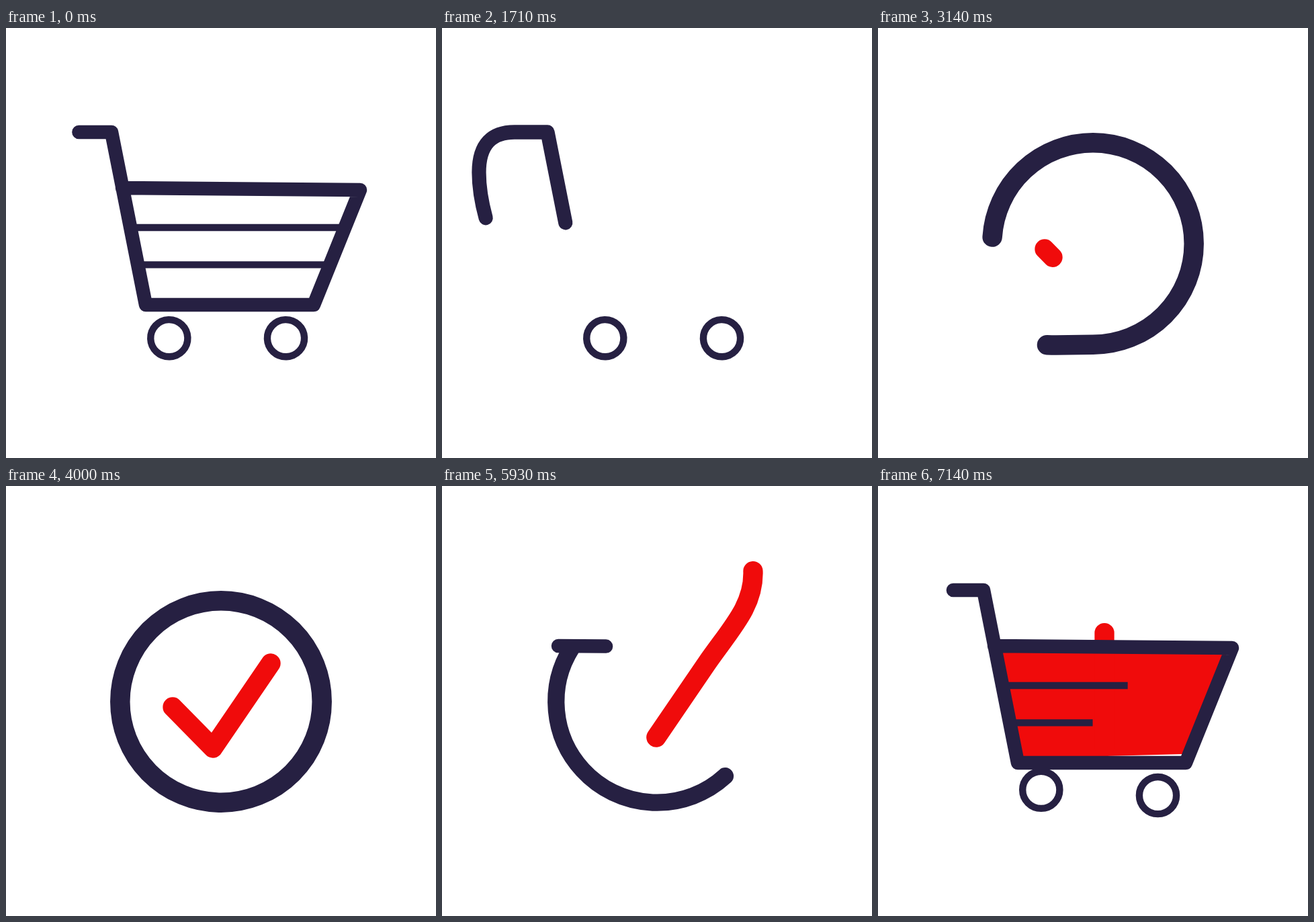
Write an HTML page with a canvas that moves like this. It is 640 px wide and 640 px high and loops after 7.21 s.

```html
<!DOCTYPE html>
<html lang="en">
<head>
<meta charset="utf-8">
<title>Cart checkout</title>
<style>
html, body { margin: 0; width: 100%; height: 100%; overflow: hidden; background: #fff; }
canvas { display: block; width: 100vw; height: 100vh; }
</style>
</head>
<body>
<canvas id="stage" width="640" height="640"></canvas>
<script>
const ctx = document.getElementById('stage').getContext('2d');
const LOOP = 7210, NAVY = '#262042', RED = '#f00b0b', RAD = Math.PI / 180;

const cart = 'M173 238L527 241 458 412 208 412 157 155 108 155';
const cartPath = new Path2D(cart);
const CART_LEN = 1099;
// The cart line runs on through a swoop into the circle.
const flowPath = new Path2D(cart +
  'C75 155 55 172 55 215C55 262 72 306 87 350C104 400 130 440 175 460' +
  'C205 471 250 472 265 472L320 471.2' +
  'A150.2 150.2 0 0 0 320 170.8A150.2 150.2 0 0 0 320 471.2');
// The tick runs on over a loop and down into the cart.
const tickPath = new Path2D('M248 329L308 390 394 264C430 212 463 180 463 130' +
  'C463 88 428 54 387 54C357 54 337 73 337 100V388');
const fillShape = new Path2D('M176 240L522 243 453.5 399 320 402.5 208 408Z');

const clamp = x => Math.min(1, Math.max(0, x));
function ease(t, start, end) {
  const x = clamp((t - start) / (end - start));
  return x * x * (3 - 2 * x);
}

// Smooth monotone curve through [time, value] keys.
function track(...keys) {
  const n = keys.length - 1;
  const slope = i => (keys[i + 1][1] - keys[i][1]) / (keys[i + 1][0] - keys[i][0]);
  const tan = keys.map((_, i) => {
    if (i === 0 || i === n) return 0;
    const a = slope(i - 1), b = slope(i);
    return a * b > 0 ? 2 * a * b / (a + b) : 0;
  });
  return t => {
    if (t <= keys[0][0]) return keys[0][1];
    if (t >= keys[n][0]) return keys[n][1];
    let i = 0;
    while (t > keys[i + 1][0]) i++;
    const [t0, v0] = keys[i], [t1, v1] = keys[i + 1];
    const h = t1 - t0, x = (t - t0) / h, y = 1 - x;
    return y * y * ((1 + 2 * x) * v0 + h * x * tan[i]) +
           x * x * ((1 + 2 * y) * v1 - h * y * tan[i + 1]);
  };
}

const flowTail = track([0, 0], [790, 330], [1140, 596], [1570, 850], [2360, 1167], [3140, 1553], [3930, 1618]);
const flowHead = track([1130, 1099], [1570, 1212], [2360, 1563], [3140, 2319], [3930, 2562]);
const flowWidth = track([1140, 20.5], [2360, 23.3], [3140, 29.5]);
const tickTail = track([5360, 0], [5430, 2.5], [6500, 322], [6930, 606], [7140, 705], [7350, 770]);
const tickHead = track([2990, 0], [3140, 17], [4000, 238.2], [5390, 238.2], [6140, 489], [6500, 702], [6720, 876]);
const level = track([6580, 408], [6930, 335], [7140, 238]);

function pen(color, width, cap) {
  ctx.strokeStyle = color;
  ctx.lineWidth = width;
  ctx.lineCap = cap || 'round';
  ctx.lineJoin = 'round';
}

function trim(path, from, to) {
  if (to - from < 0.1) return;
  ctx.setLineDash([to - from, 9999]);
  ctx.lineDashOffset = -from;
  ctx.stroke(path);
  ctx.setLineDash([]);
}

function arc(x, y, r, from, to) {
  ctx.beginPath();
  ctx.arc(x, y, r, from * RAD, to * RAD);
  ctx.stroke();
}

function shelf(x, y, end) {
  if (end <= x) return;
  pen(NAVY, 10.3, 'butt');
  ctx.beginPath();
  ctx.moveTo(x, y);
  ctx.lineTo(end, y);
  ctx.stroke();
}

// A wheel opens at the lower left until nothing is left.
function openWheel(x, gone) {
  if (gone >= 1) return;
  pen(NAVY, 10.4);
  arc(x, 461.7, 27.6, 133 + 180 * gone, 493 - 180 * gone);
}

// A wheel drops out from behind the cart floor.
function dropWheel(x, p) {
  if (p <= 0) return;
  ctx.save();
  ctx.beginPath();
  ctx.rect(0, 412, 640, 228);
  ctx.clip();
  pen(NAVY, 10.4);
  arc(x, 378 + 83.7 * p, 27.6, 0, 360);
  ctx.restore();
}

function fillCart(t) {
  const y = level(t);
  if (y >= 408) return;
  ctx.save();
  ctx.beginPath();
  ctx.rect(0, y, 640, 640 - y);
  ctx.clip();
  ctx.fillStyle = RED;
  ctx.fill(fillShape);
  ctx.restore();
}

function draw(t) {
  ctx.fillStyle = '#fff';
  ctx.fillRect(0, 0, 640, 640);

  if (t < 3200) {
    openWheel(242.8, ease(t, 2040, 2850));
    openWheel(416.5, ease(t, 2380, 3120));
    shelf(190, 297, 500 - 310 * ease(t, 590, 1570));
    shelf(200, 352.3, 476 - 276 * ease(t, 790, 1650));
  } else {
    dropWheel(242.8, ease(t, 6476, 7316));
    dropWheel(416.5, ease(t, 6359, 7199));
  }

  fillCart(t);
  pen(RED, 29.3);
  trim(tickPath, tickTail(t), tickHead(t));

  if (t < 5360) {
    pen(NAVY, flowWidth(t));
    trim(flowPath, flowTail(t), flowHead(t));
    return;
  }

  const gone = ease(t, 5350, 6450);
  if (gone < 1) {
    pen(NAVY, 29.5 - 9 * ease(t, 5500, 6400));
    arc(320, 321, 150.2, 212.3 + 360 * gone, 572.3);
  }
  shelf(190, 297, 190 + 181 * (t - 6860) / 280);
  shelf(200, 352.3, 200 + 119 * (t - 6930) / 210);
  pen(NAVY, 20.5);
  trim(cartPath, 0, CART_LEN * ease(t, 5700, 7190));
}

function tick() {
  draw(performance.now() % LOOP);
  requestAnimationFrame(tick);
}
tick();
</script>
</body>
</html>
```
